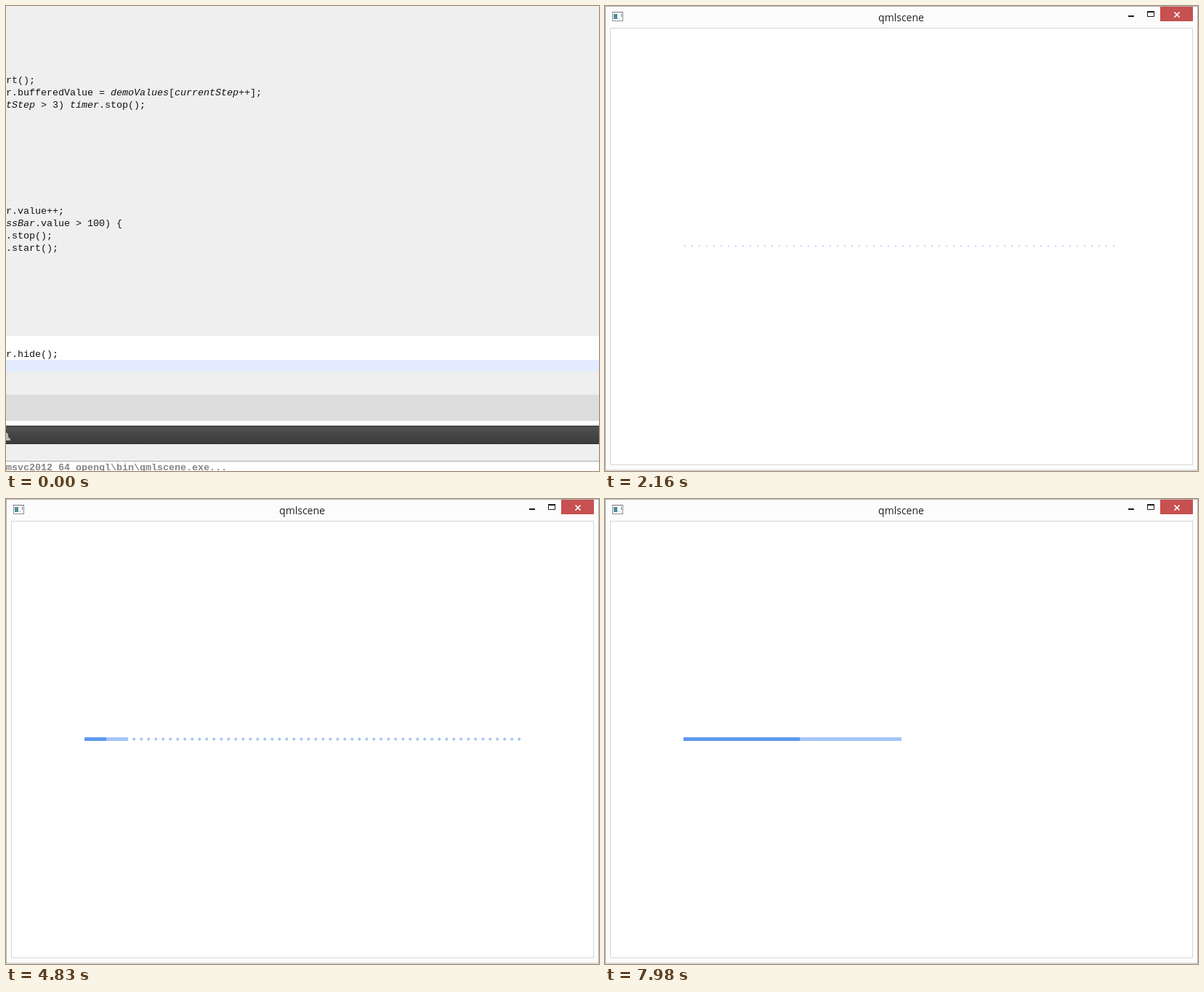
Write an HTML page that moves like this. It is 816x640 px and loops after 8000 ms.

```html
<!DOCTYPE html>
<html lang="en">
<head>
<meta charset="utf-8">
<title>Progress bar demo</title>
<style>
  html, body { margin: 0; width: 100%; height: 100%; overflow: hidden; background: #fff; }
  svg { display: block; }
  #editor text { font: 13.333px "Liberation Mono", monospace; fill: #111; white-space: pre; }
  #editor .output { font-weight: bold; fill: #858585; }
  .italic { font-style: italic; }
  #title { font: 14px "Open Sans", sans-serif; fill: #222; text-anchor: middle; }
</style>
</head>
<body>
<svg width="816" height="640" viewBox="0 0 816 640">
  <defs>
    <linearGradient id="toolbar" x2="0" y2="1">
      <stop offset="0" stop-color="#555"/>
      <stop offset=".5" stop-color="#444"/>
      <stop offset="1" stop-color="#3c3c3c"/>
    </linearGradient>
    <clipPath id="unbuffered"><rect id="clip" x="108" y="326" width="600" height="10"/></clipPath>
  </defs>

  <g id="editor">
    <rect width="816" height="640" fill="#efefef"/>
    <rect y="454" width="816" height="33" fill="#fff"/>
    <rect y="487" width="816" height="16" fill="#e2ebff"/>
    <rect y="535" width="816" height="36" fill="#ddd"/>
    <rect y="571" width="816" height="7" fill="#fff"/>
    <rect y="577.5" width="816" height="25.5" fill="url(#toolbar)"/>
    <path d="M0 578.5H816M0 602.5H816" stroke="#2b2b2b"/>
    <path d="M0 587L3 589V593L6 596V598H0Z" fill="#bbb"/>
    <rect y="626" width="816" height="1" fill="#a8a8a8"/>
    <rect y="627" width="816" height="13" fill="#fff"/>
    <text y="106">rt();</text>
    <text y="123">r.bufferedValue = <tspan class="italic">demoValues</tspan>[<tspan class="italic">currentStep</tspan>++];</text>
    <text y="140"><tspan class="italic">tStep</tspan> &gt; 3) <tspan class="italic">timer</tspan>.stop();</text>
    <text y="286">r.value++;</text>
    <text y="303"><tspan class="italic">ssBar</tspan>.value &gt; 100) {</text>
    <text y="320">.stop();</text>
    <text y="337">.start();</text>
    <text y="483">r.hide();</text>
    <text y="639" class="output">msvc2012_64_opengl\bin\qmlscene.exe...</text>
  </g>

  <g id="window">
    <rect x=".5" y=".5" width="815" height="638.5" fill="#fcfcfc" stroke="#b4b4b4"/>
    <rect x="7.5" y="30.5" width="801" height="601" fill="#fff" stroke="#d6d6d6"/>
    <g id="icon">
      <rect x="10.5" y="8.5" width="14" height="12" fill="#fff" stroke="#8b8f92"/>
      <path d="M10 8.5H25" stroke="#707578"/>
      <rect x="12" y="11" width="5" height="7" fill="#4f8f98"/>
      <path d="M18 17.5H21" stroke="#b9d3c4"/>
      <path d="M22.5 11V15" stroke="#4d7c94"/>
    </g>
    <text id="title" x="407.5" y="21">qmlscene</text>
    <rect x="720" y="13" width="8" height="2" fill="#1a1a1a"/>
    <path d="M746.5 8V14.5H755.5V8M746 8H756" fill="none" stroke="#1a1a1a"/>
    <rect x="746" y="7" width="10" height="2" fill="#1a1a1a"/>
    <rect x="764" y="1" width="45" height="20" fill="#c75050"/>
    <path d="M783.5 8.5L790.5 15.5M790.5 8.5L783.5 15.5" stroke="#fff" stroke-width="1.7"/>
    <g clip-path="url(#unbuffered)">
      <path id="dots" d="M100 330.5H721" stroke="#a4c4f6" stroke-linecap="round" stroke-dasharray="0 10"/>
    </g>
    <rect id="buffer" x="108" y="328" height="5" fill="#a4c5fa"/>
    <rect id="value" x="108" y="328" height="5" fill="#5c99ee"/>
  </g>
</svg>
<script>
const LOOP = 8000;
const WINDOW_OPENS = 30;
const DOT_CYCLE = 5250, DOT_START = 3680, SLIDE = 3000, SHRINK = 1000;
const VALUE_KEYS = [
  [3200, 0], [3570, 5], [4410, 20], [4830, 30], [5220, 43],
  [5790, 62], [6030, 71], [6840, 106], [7620, 144], [8000, 161]
];

const byId = id => document.getElementById(id);
const set = (id, name, value) => byId(id).setAttribute(name, value);
const progress = (t, start, duration) => Math.min(1, Math.max(0, (t - start) / duration));
const outQuad = u => 1 - (1 - u) ** 2;
const inOutQuad = u => u < .5 ? 2 * u * u : 1 - 2 * (1 - u) ** 2;

function valueWidth(t) {
  const next = VALUE_KEYS.findIndex(([time]) => t < time);
  if (next <= 0) return 0;
  const [t0, w0] = VALUE_KEYS[next - 1], [t1, w1] = VALUE_KEYS[next];
  return w0 + (w1 - w0) * (t - t0) / (t1 - t0);
}

function bufferWidth(t) {
  return 60 * inOutQuad(progress(t, 2770, 600)) + 240 * inOutQuad(progress(t, 5420, 600));
}

// Dots slide one spacing to the right, shrink away, then pause.
function drawDots(t) {
  const phase = (t - DOT_START + DOT_CYCLE) % DOT_CYCLE;
  const shift = 10 * outQuad(progress(phase, 0, SLIDE));
  const scale = 1 - progress(phase, SLIDE, SHRINK) ** 2;
  set('dots', 'transform', `translate(${shift})`);
  set('dots', 'stroke-width', 4 * scale);
  set('dots', 'visibility', scale > 0 ? 'inherit' : 'hidden');
}

function draw(t) {
  const opened = t >= WINDOW_OPENS;
  set('editor', 'visibility', opened ? 'hidden' : 'visible');
  set('window', 'visibility', opened ? 'visible' : 'hidden');
  const buffered = Math.round(bufferWidth(t));
  set('buffer', 'width', buffered);
  set('value', 'width', Math.round(valueWidth(t)));
  set('clip', 'x', 108 + buffered);
  set('clip', 'width', 600 - buffered);
  drawDots(t);
}

const start = performance.now();
function tick() {
  draw((performance.now() - start) % LOOP);
  requestAnimationFrame(tick);
}
tick();
</script>
</body>
</html>
```
